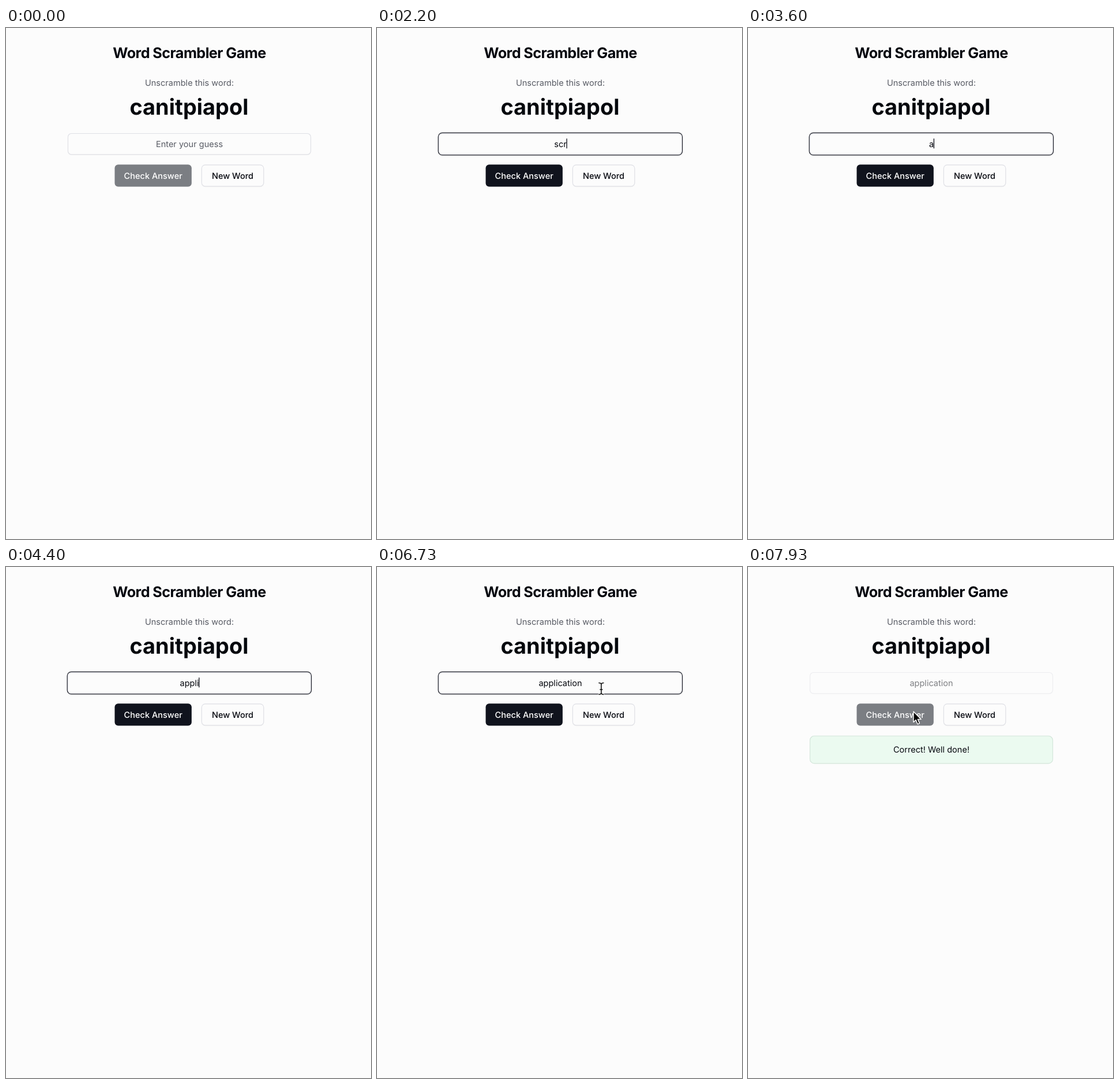
An HTML page that plays this animation: 633 by 884 pixels, repeating every 8000 ms.

```html
<!DOCTYPE html>
<html lang="en">
<head>
<meta charset="utf-8">
<title>Word Scrambler Game</title>
<style>
  html, body { margin: 0; width: 100%; height: 100%; overflow: hidden; background: #fcfcfc; }
  svg { display: block; width: 100%; height: 100%; }
  text {
    font-family: Inter, Roboto, sans-serif;
    font-size: 14.55px;
    font-optical-sizing: none;
    text-rendering: geometricPrecision;
    text-anchor: middle;
    fill: #05070e;
  }
  .title { font-size: 25.3px; font-weight: 700; letter-spacing: -0.025em; }
  .word { font-size: 37.95px; font-weight: 700; fill: #05080d; }
  .muted { fill: #585b64; }
  .label { font-weight: 500; }
  .box { fill: #fcfcfc; stroke: #dfe0e6; stroke-width: 1.1; }
  .shade { fill: none; stroke: #000; stroke-opacity: .05; stroke-width: 1.4; }
</style>
</head>
<body>
<svg viewBox="0 0 633 884">
  <rect width="633" height="884" fill="#fcfcfc"/>
  <text class="title" x="318" y="51.5">Word Scrambler Game</text>
  <text class="muted" x="318" y="100.3">Unscramble this word:</text>
  <text class="word" x="317.5" y="149.6">canitpiapol</text>

  <g id="field">
    <rect class="shade" x="107.5" y="183.4" width="421" height="36" rx="6"/>
    <rect class="box" x="107.5" y="182.5" width="421" height="36.2" rx="6"/>
    <rect id="ring" x="106.2" y="181.3" width="423.4" height="38.6" rx="7" fill="none" stroke="#20222b" stroke-width="1.2"/>
    <text id="entry" x="318" y="206"></text>
    <rect id="caret" y="191.3" width="1.3" height="17" fill="#0b0d16"/>
  </g>

  <rect id="check" x="188.5" y="236.3" width="133.4" height="38.2" rx="6"/>
  <text class="label" x="255.2" y="261.2" style="fill:#fff">Check Answer</text>
  <rect class="shade" x="339.4" y="237.8" width="107.4" height="36.8" rx="6"/>
  <rect class="box" x="339.4" y="236.9" width="107.4" height="36.8" rx="6"/>
  <text class="label" x="393" y="261.2">New Word</text>

  <g id="result">
    <rect x="107.5" y="292.3" width="421" height="47.6" rx="7.5" fill="#ebfaf0" stroke="#d3e5da" stroke-width="1.1"/>
    <text x="318" y="320.6">Correct! Well done!</text>
  </g>

  <path id="arrow" d="M0 0V18.4L4.1 14.6L7.2 21.8L10.4 20.4L7.4 13.4H13.2Z" fill="#000" stroke="#fff" stroke-width="1.4" stroke-linejoin="round"/>
  <g id="beam" fill="none" stroke-linecap="round">
    <path d="M-4-10Q0-10 0-7Q0-10 4-10M0-7V7M-4 10Q0 10 0 7Q0 10 4 10M-2 1.5H2" stroke="#fff" stroke-width="3"/>
    <path d="M-4-10Q0-10 0-7Q0-10 4-10M0-7V7M-4 10Q0 10 0 7Q0 10 4 10M-2 1.5H2" stroke="#111" stroke-width="1.6"/>
  </g>
</svg>
<script>
const LOOP = 8000, TICK = 1000 / 15;
const FOCUS = 1070, BLUR = 7200, SOLVED = 7330;

// Each edit: time and the text in the field from then on.
const edits = [
  [0, ""], [1730, "s"], [2000, "sc"], [2200, "scr"],
  [2870, "sc"], [3070, "s"], [3270, ""],
  [3470, "a"], [3870, "ap"], [4000, "app"], [4200, "appl"], [4400, "appli"],
  [4800, "applic"], [5000, "applica"], [5200, "applicat"],
  [5470, "applicati"], [5600, "applicatio"], [6070, "application"]
];
const caretGaps = [[1530, 1730], [2730, 2870], [6600, 7130]];
const moves = [
  { show: 330, end: 980, hide: 1730, from: [564, 523], to: [408, 203] },
  { show: 6600, end: 7130, hide: LOOP, from: [408, 203], to: [287, 250] }
];

const $ = id => document.getElementById(id);
const [field, ring, entry, caret, check, result, arrow, beam] =
  ["field", "ring", "entry", "caret", "check", "result", "arrow", "beam"].map($);

const show = (el, on) => el.setAttribute("visibility", on ? "visible" : "hidden");
const within = (t, [a, b]) => t >= a && t < b;
const ease = p => p * p * (3 - 2 * p);

function pointerAt(t) {
  const m = moves.find(m => within(t, [m.show, m.hide]));
  if (!m) return null;
  const stepped = Math.floor((t + 4) / TICK) * TICK;
  const p = ease(Math.min(1, Math.max(0, (stepped - m.show) / (m.end - m.show))));
  return m.from.map((v, i) => v + (m.to[i] - v) * p);
}

function drawField(t, text) {
  const focused = within(t, [FOCUS, BLUR]);
  entry.textContent = text || "Enter your guess";
  entry.setAttribute("class", text ? "" : "muted");
  field.setAttribute("opacity", t >= SOLVED ? 0.5 : 1);
  show(ring, focused);
  show(caret, focused && !caretGaps.some(gap => within(t, gap)));
  const width = text ? entry.getComputedTextLength() : 0;
  caret.setAttribute("x", 318 + width / 2 - 0.3);
}

function drawPointer(point) {
  const overField = point && within(point[1], [182, 219]) && within(point[0], [107, 529]);
  show(beam, overField);
  show(arrow, point && !overField);
  if (point) (overField ? beam : arrow).setAttribute("transform", `translate(${point})`);
}

function draw(t) {
  const text = edits.filter(e => e[0] <= t).pop()[1];
  const point = pointerAt(t);
  const hover = point && within(point[0], [188, 322]) && within(point[1], [236, 275]);
  const disabled = !text || t >= SOLVED;
  drawField(t, text);
  check.setAttribute("fill", disabled ? "#7b7e83" : hover ? "#212532" : "#10131d");
  show(result, t >= SOLVED);
  drawPointer(point);
}

const start = performance.now();
function frame() {
  draw((performance.now() - start) % LOOP);
  requestAnimationFrame(frame);
}
frame();
</script>
</body>
</html>
```
